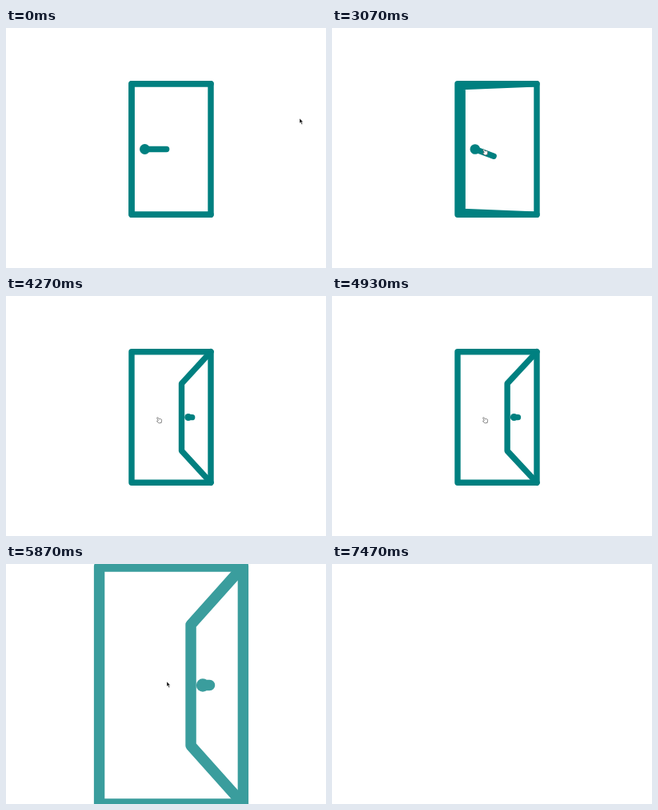
Animation, 400 px wide and 300 px high, one loop 8.14 s. Source, as an HTML page:

```html
<!DOCTYPE html>
<html lang="en">
<head>
<meta charset="utf-8">
<title>Opening door</title>
<style>
  html, body { margin: 0; width: 100%; height: 100%; overflow: hidden; background: #fff; }
  svg { display: block; width: 100vw; height: 100vh; }
  .line { fill: none; stroke: #008080; stroke-width: 7.4; stroke-linecap: round; stroke-linejoin: round; }
</style>
</head>
<body>
<svg viewBox="0 0 400 300">
  <g id="door">
    <rect class="line" x="157" y="69.7" width="99" height="163.6"/>
    <path id="leaf" class="line"/>
    <path id="bar" class="line"/>
    <circle id="knob" cy="151.5" fill="#008080"/>
  </g>
  <g id="cursor">
    <path id="arrow" d="M0 0V6L1.4 4.8 2.6 7.5 3.7 7 2.5 4.4H4.4Z" fill="#111" stroke="#fff" stroke-width=".4"/>
    <path id="hand" d="M-1.4 .8Q-.6-.2.2.7L1.2 2.2 3.6 2.3Q4.8 2.6 4.6 4L4.2 6.9 1.2 7.4-1.2 5.4Q-1.8 4.4-.4 4.4L.3 4.2Z"
      fill="#fff" stroke="#555" stroke-width=".7" stroke-linejoin="round"/>
  </g>
</svg>
<script>
const LOOP = 8140, TICK = 1000 / 15;
const CX = 206.5, CY = 151.5;
const $ = id => document.getElementById(id);
const [door, leaf, bar, knob, cursor, arrow, hand] =
  ['door', 'leaf', 'bar', 'knob', 'cursor', 'arrow', 'hand'].map($);

const clamp = v => Math.min(1, Math.max(0, v));
const span = (t, from, length) => clamp((t - from) / length);
const mix = (a, b, p) => a + (b - a) * p;

const elasticOut = p => p <= 0 ? 0 : p >= 1 ? 1
  : 1 + 2 ** (-10 * p) * Math.sin((p - .075) * Math.PI * 2 / .3);
const expoIn = p => p <= 0 ? 0 : 2 ** (10 * (p - 1));
const linear = p => p;
const cubicOut = p => 1 - (1 - p) ** 3;
const smooth = p => p * p * (3 - 2 * p);
const quadIn = p => p * p;

// start, end, x, y, easing
const moves = [
  [0, 60, 361.5, 117.5, linear],
  [333, 600, 274, 168, smooth],
  [867, 1067, 262, 168, linear],
  [1200, 2067, 191.5, 151.5, cubicOut],
  [2067, 2267, 190, 151.5, linear],
  [5667, 5866, 201, 147, smooth],
  [6867, 7467, 205, 60, quadIn]
];

function cursorAt(t) {
  let x = 367, y = 113;
  for (const [from, to, tx, ty, ease] of moves) {
    const p = ease(span(t, from, to - from));
    x = mix(x, tx, p);
    y = mix(y, ty, p);
  }
  return [x, y];
}

function drawDoor(t) {
  const open = elasticOut(span(t, 3030, 3350));
  const x = 157 + 63.1 * open, dy = 81.8 - 40.3 * open;
  leaf.setAttribute('d', `M256 69.7L${x} ${CY - dy}V${CY + dy}L256 233.3`);

  const angle = span(t, 2810, 120) * 21 * Math.PI / 180;
  const left = 173.5 + 54.8 * open;
  const endX = mix(173.5 + 27.1 * Math.cos(angle), 233, open);
  const endY = CY + 27.1 * Math.sin(angle) * (1 - clamp(open));
  bar.setAttribute('d', `M${left} ${CY}L${endX} ${endY}`);
  knob.setAttribute('cx', left);
  knob.setAttribute('r', 6.5 - 2 * open);

  const zoom = expoIn(span(t, 5000, 1100));
  door.setAttribute('transform',
    `translate(${CX} ${CY}) scale(${1 + 3.55 * zoom}) translate(${-CX} ${-CY})`);
  door.setAttribute('opacity', 1 - zoom);
}

function drawCursor(t) {
  const [x, y] = cursorAt(t);
  const over = t > 1600 && t < 5700 && x < 204 && y < 155;
  cursor.setAttribute('transform', `translate(${x} ${y})`);
  cursor.style.display = t > 7460 ? 'none' : '';
  arrow.style.display = over ? 'none' : '';
  hand.style.display = over ? '' : 'none';
}

const start = performance.now();
function frame() {
  const now = (performance.now() - start) % LOOP;
  const t = Math.floor((now + 4) / TICK) * TICK;
  drawDoor(t);
  drawCursor(t);
  requestAnimationFrame(frame);
}
frame();
</script>
</body>
</html>
```
